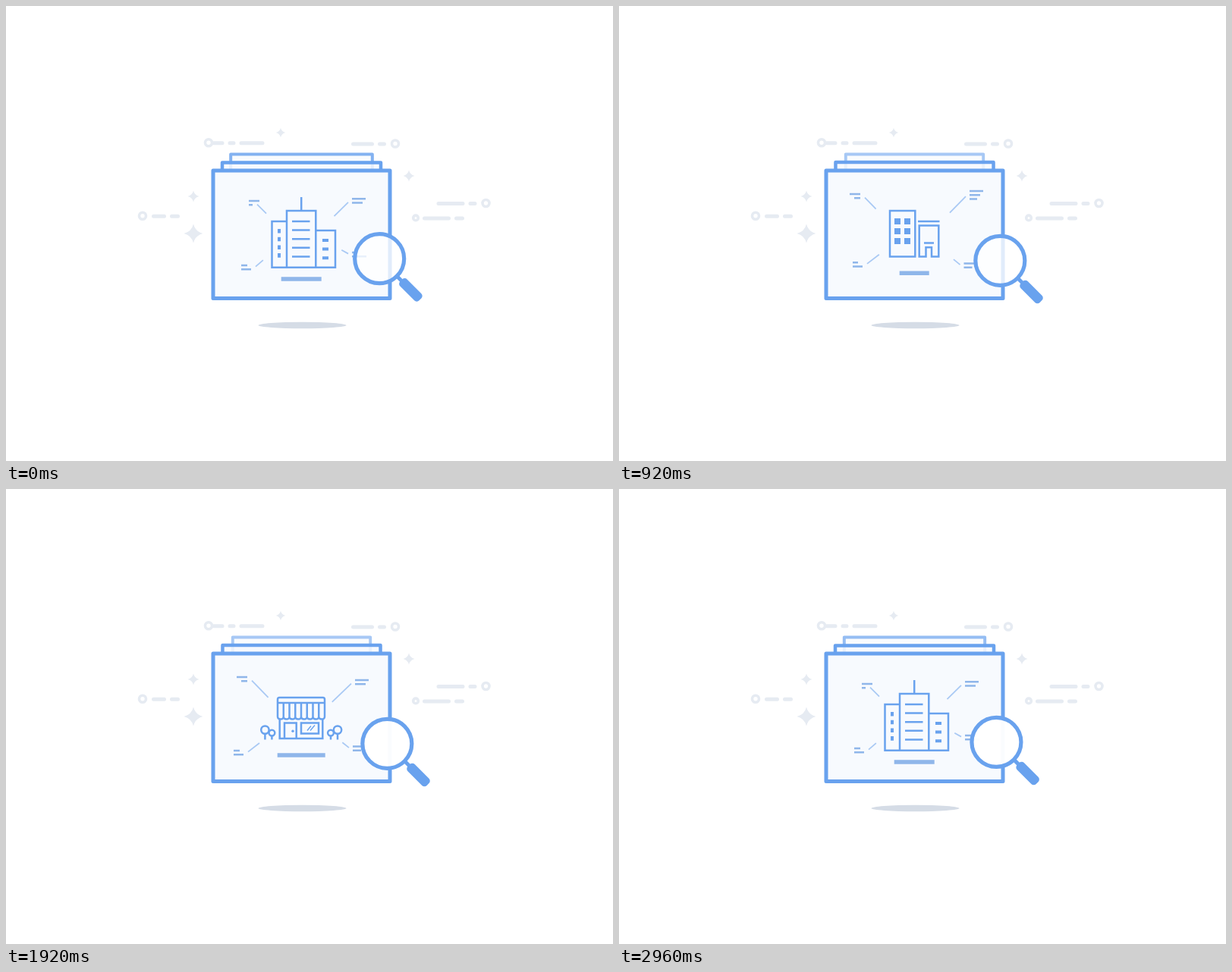
Write an HTML page that moves like this. It is 800 px wide and 600 px high and loops after 3000 ms.

```html
<!DOCTYPE html>
<html lang="en">
<head>
<meta charset="utf-8">
<title>Searching cards</title>
<style>
html, body { margin: 0; width: 100%; height: 100%; overflow: hidden; background: #fff; }
svg { display: block; width: 100%; height: 100%; }
.frame { fill: #f7fafe; stroke: #69a2ee; stroke-width: 5; stroke-linejoin: round; }
.art { fill: none; stroke: #69a2ee; stroke-width: 2.5; }
.art .solid { fill: #69a2ee; stroke: none; }
.art .note { stroke: #8fb6ea; }
.art .base { stroke: #8fb6ea; stroke-width: 5.5; }
.art .lead { stroke: #a9c9f4; stroke-width: 1.8; }
.art .thin { stroke-width: 1.4; }
.decor { fill: none; stroke: #e6ebf2; stroke-width: 5; stroke-linecap: round; }
.decor circle { stroke-width: 3.6; }
.decor .star { fill: #e6ebf2; stroke: none; }
</style>
</head>
<body>
<svg viewBox="0 0 800 600">
  <g id="decor" class="decor"></g>
  <ellipse cx="390.5" cy="421" rx="58" ry="4.2" fill="#d5dce6"/>
  <g id="cards"></g>
  <g id="lens">
    <path d="M24 24L31 31" stroke="#69a2ee" stroke-width="5"/>
    <rect x="40.5" y="-6.5" width="35.5" height="13" rx="4.5" fill="#69a2ee" transform="rotate(45)"/>
    <circle id="glass" r="32.5" fill="#fff"/>
    <circle r="32.5" fill="none" stroke="#69a2ee" stroke-width="5.2"/>
  </g>
</svg>
<script>
const $ = id => document.getElementById(id);
const MID = 389.2;
const path = (d, cls = '') => `<path class="${cls}" d="${d}"/>`;
const circle = (x, y, r, cls = '') => `<circle class="${cls}" cx="${x}" cy="${y}" r="${r}"/>`;
const box = (x, y, w, h) => `M${x} ${y}h${w}v${h}h${-w}z`;
const bar = (x, y, w) => `M${x} ${y}h${w}`;
const repeat = (n, fn) => Array.from({ length: n }, (_, i) => fn(i)).join('');

// Background: a ring trailing dashes in direction dir, and four-pointed stars
function trail(x, y, r, dir, start, ...lengths) {
  let d = '', at = x + dir * (start + 2.5);
  for (const len of lengths) {
    d += bar(at, y + 0.5, dir * (len - 5));
    at += dir * (len + 5);
  }
  return circle(x, y, r) + path(d);
}

function star(x, y, r) {
  const k = r * 0.2;
  return path(`M${x} ${y - r}q${k} ${r - k} ${r} ${r}q${k - r} ${k} ${-r} ${r}` +
    `q${-k} ${k - r} ${-r} ${-r}q${r - k} ${-k} ${r} ${-r}z`, 'star');
}

$('decor').innerHTML =
  trail(267, 180.2, 4.5, 1, 4.5, 16, 10, 33) +
  trail(513, 181.5, 4.5, -1, 12, 11, 30) +
  trail(632.5, 260, 4.5, -1, 12, 11, 37) +
  trail(540, 279.4, 3.3, 1, 9, 37, 13) +
  trail(180, 276.8, 4.5, 1, 12, 19, 13) +
  star(362, 167, 6.2) + star(247, 251, 7.5) + star(247, 300, 12.5) + star(531, 224, 7.5);

// A small caption and a leader line pointing at the middle of the card.
// Negative widths align the rows to the right.
function callout(x, y, length, ...widths) {
  const left = x < MID, top = y < 300, last = widths[widths.length - 1];
  const rows = widths.map((w, i) => bar(x, y + i * 5.2, w)).join('');
  const sx = left ? Math.max(x, x + last) + 6 : x - 5;
  const sy = y + (widths.length - 1) * 2.6 + (top ? 2 : -1);
  const dx = MID - sx, dy = (top ? 320 : 292) - sy, k = length / Math.hypot(dx, dy);
  return path(rows, 'note') + path(`M${sx} ${sy}l${dx * k} ${dy * k}`, 'lead');
}

const base = (half, y) => path(bar(MID - half, y, 2 * half), 'base');

// Card illustrations
const towers =
  path(box(350.5, 284, 19.5, 60.7) + box(370, 270, 38.3, 74.7) + box(408.3, 296, 25.7, 48.7) + `M${MID} 252v18`) +
  path(repeat(5, i => bar(377, 284 + i * 11.6, 23.5))) +
  path(repeat(4, i => box(358, 294 + i * 10.7, 4, 5.6)) + repeat(3, i => box(417, 307 + i * 11.6, 8, 4)), 'solid') +
  base(26.5, 360) +
  callout(320, 257, 17, 14, 5) + callout(456, 254.3, 26, 18, 14) +
  callout(310, 342, 13, 8, 13) + callout(456, 325, 10, 8, 19);

const offices =
  path(box(357, 270, 33.3, 60.5) + bar(394, 284, 28.5) + bar(402, 312.5, 13) +
    'M404.5 330.5h-8.8v-41h25.6v41h-9.3v-12.2h-7.5z') +
  path(repeat(6, i => box(363 + i % 2 * 13, 280 + (i >> 1) * 13, 8, 8)), 'solid') +
  base(19.5, 352.3) +
  callout(318, 248, 21, -14, -8) + callout(462, 244, 30, 18, 14, 10) +
  callout(308, 338.3, 20, 7, 13) + callout(454.5, 339.5, 11, 18, 11);

const tree = side => [[47.8, 317.6, 5.2], [38.8, 321.6, 3.9]].map(([dx, y, r]) =>
  circle(MID + side * dx, y, r) + path(`M${MID + side * dx} ${y + r}V330.5`)).join('');

const shop =
  path('M358 282v-4.5q0-2.5 2.5-2.5h57q2.5 0 2.5 2.5v4.5z' +
    repeat(8, i => `M${358 + i * 7.75} 281v19q0 3.5 3.9 3.5t3.85-3.5v-19`)) +
  path('M360.7 303v26h56.6v-26' + box(367, 308.5, 15.7, 20.5) + box(389, 308.5, 23, 14)) +
  path('M397 318.5l5-6M401 318.5l6-7', 'thin') + circle(378, 319.3, 1.7, 'solid') +
  tree(-1) + tree(1) + base(31.5, 351) +
  callout(318, 248, 31, -14, -8) + callout(460, 252, 35, 18, 14) +
  callout(300, 345, 19, 8, 13) + callout(457, 339.5, 11, 18, 11);

const cardHtml = '<g><rect class="frame" x="273" y="217" width="233" height="168.5"/>' +
  [towers, offices, shop].map(s => `<g class="art">${s}</g>`).join('') + '</g>';
$('cards').innerHTML = cardHtml.repeat(4);
const [fresh, third, second, front] = $('cards').children;

// Motion
const mix = (a, b, k) => a + (b - a) * k;
const span = (t, a, b) => Math.min(1, Math.max(0, (t - a) / (b - a)));
// cubic-bezier(.42, 0, .58, 1)
const ease = x => {
  let lo = 0, hi = 1;
  for (let i = 0; i < 24; i++) {
    const s = (lo + hi) / 2;
    const bx = 1.26 * s * (1 - s) ** 2 + 1.74 * s * s * (1 - s) + s ** 3;
    if (bx < x) lo = s; else hi = s;
  }
  return lo * lo * (3 - 2 * lo);
};

function place(card, { scene, top = 217, scale = 1, shift = 0, alpha = 1, fill = 1, art = 1 }) {
  card.setAttribute('transform',
    `translate(${389.5 + shift} ${top}) scale(${scale}) translate(-389.5 -217)`);
  card.setAttribute('opacity', alpha);
  const [frame, ...arts] = card.children;
  frame.setAttribute('fill-opacity', fill);
  arts.forEach((g, i) => g.setAttribute('opacity', i === scene % 3 ? art : 0));
}

const LOOP = 3000, CYCLE = 1000, TICK = 40;
const BACK = { top: 195.5, scale: 0.801 }, MIDDLE = { top: 206.5, scale: 0.897 };

function draw(time) {
  const t = Math.floor((time % LOOP) / TICK) * TICK;
  const n = Math.floor(t / CYCLE), p = t % CYCLE;
  const out = ease(span(p, 510, 890));
  const rise = ease(span(p, 600, 900));
  const step = ease(span(p, 680, 960));
  const born = span(p, 720, 1000);

  place(front, { scene: n, shift: -170 * out, alpha: 1 - span(p, 600, 900) });
  place(second, { scene: n + 1, top: mix(MIDDLE.top, 217, rise),
    scale: mix(MIDDLE.scale, 1, rise), fill: mix(0.85, 1, rise) });
  place(third, { scene: n + 2, top: mix(BACK.top, MIDDLE.top, step),
    scale: mix(BACK.scale, MIDDLE.scale, step), alpha: mix(0.82, 1, step), fill: 0.85, art: step });
  place(fresh, { scene: n, top: BACK.top, scale: mix(0.67, BACK.scale, ease(born)),
    alpha: 0.82 * born, art: 0 });

  const a = p / CYCLE * 2 * Math.PI;
  $('lens').setAttribute('transform',
    `translate(${492.2 - 21 * Math.sin(a)} ${354.2 - 21 * Math.cos(a)})`);
  $('glass').setAttribute('fill-opacity', n === 0 ? 0.8 : 0.97);
}

const start = performance.now();
function loop() {
  draw(performance.now() - start);
  requestAnimationFrame(loop);
}
loop();
</script>
</body>
</html>
```
